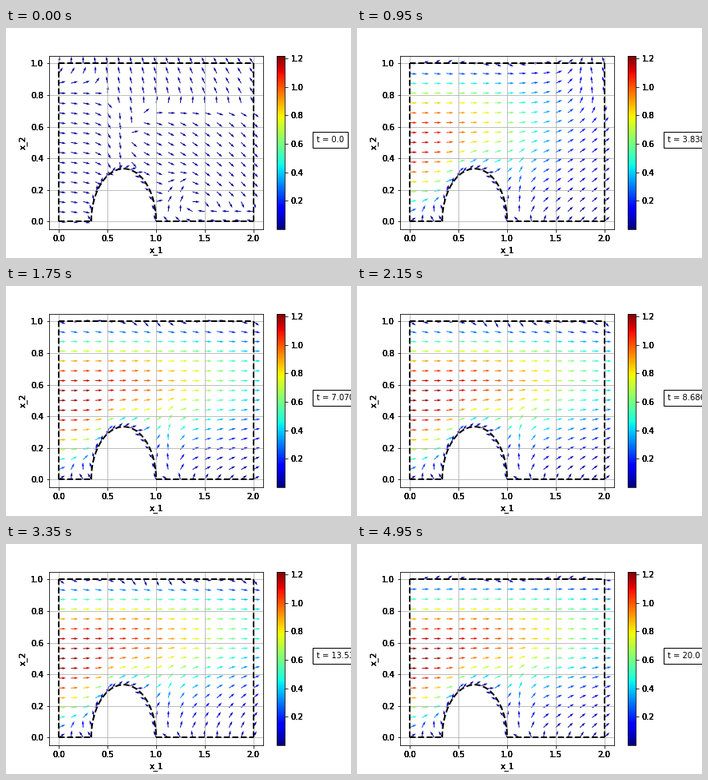
A matplotlib script for the animation above (5000 ms loop, 432x288 px).

```python
import numpy as np
import matplotlib.pyplot as plt
from matplotlib.animation import FuncAnimation

FRAMES, STEP_MS, T_END = 100, 50, 20.0
CX, RADIUS = 2 / 3, 1 / 3
V_MIN, V_MAX = 0.001, 1.218


def unit(deg):
    return np.exp(1j * np.radians(deg))


def sigmoid(s):
    return 1 / (1 + np.exp(-s))


def bump(s, width):
    return np.exp(-(s / width) ** 2)


def mix(a, b, w):
    return a + (b - a) * w


def sample_points():
    gx, gy = np.meshgrid(np.linspace(0, 2, 17), np.linspace(0, 1, 17))
    outside = np.hypot(gx - CX, gy) > RADIUS + 0.005
    arc = np.linspace(0, np.pi, 17)
    return (np.append(gx[outside], CX + RADIUS * np.cos(arc)),
            np.append(gy[outside], RADIUS * np.sin(arc)))


x, y = sample_points()
gap = np.maximum(np.hypot(x - CX, y) - RADIUS, 0)
bearing = np.degrees(np.arctan2(y, x - CX))


def rest_field():
    """Faint drift before the inflow starts."""
    z = unit(-8 - 20 * x)
    z = mix(z, unit(-80), bump(x - 0.6, 0.17))
    ceiling = 0.92 - 0.2 * sigmoid((x - 0.45) / 0.08) - 0.15 * bump(x - 0.75, 0.1)
    z = mix(z, unit(95 + 14 * x), sigmoid((y - ceiling) / 0.05))
    z = mix(z, unit(165), sigmoid((0.1 - y) / 0.03) * sigmoid((x - 1.05) / 0.05))
    return mix(z, unit(70), bump(np.hypot(x - 1.2, y - 0.15), 0.15))


rest = rest_field()


def front(t):
    return 0.5 * t - 0.6


def speed(t):
    ramp = 1 - np.exp(-(t / 0.8) ** 1.5)
    skew = 1 + x * (0.25 + 0.3 * min(t / 17, 1))
    profile = np.maximum(np.sin(np.pi * y ** skew), 0) ** 0.95
    wall = 1 - np.exp(-gap / 0.07)
    reach = sigmoid((front(t) - x) / 0.45)
    return 0.03 + 1.18 * ramp * profile * wall * reach * np.exp(-0.24 * x ** 2)


def direction(t):
    swing = np.cos(2 * np.pi * (t - 7) / 13) * np.exp(-abs(t - 7) / 12)
    lift = 50 - 22 * swing
    dip = -12 * np.sin(np.pi * t / 18.5)
    top = 10 - 55 * bump(t - 11.5, 5.5)
    low = np.clip((0.62 - y) / 0.55, 0, 1) ** 1.2

    # wake behind the obstacle
    angle = lift * low * sigmoid((x - 0.9) / 0.15)
    angle += (105 - lift) * np.clip(1.6 * low, 0, 1) * bump(x - 1.12, 0.14)
    angle += 60 * bump(y, 0.03) * np.clip(2 - x, 0, 1) * (x > 1)
    # rise over the obstacle and the corner before it
    angle += 35 * np.exp(-gap / 0.12) * sigmoid((0.95 - x) / 0.05)
    angle += (30 + 75 * np.clip(x / 0.2, 0, 1)) * bump(y, 0.11) * (x < 0.4)
    angle += dip * bump(y - 0.95, 0.08)
    z = unit(angle)

    # fluid the front has not reached yet
    ahead = sigmoid((x - front(t) - 0.15) / 0.2) * np.clip(x / 0.4, 0, 1)
    climb = sigmoid((y - 0.7) / 0.06) * sigmoid((x - front(t) - 0.35) / 0.08)
    z = mix(z, unit(40 + 75 * climb), ahead)

    z = mix(z, unit(top + 30 * np.sin(5 * x)), bump(1 - y, 0.03) * (1 - ahead))
    z = mix(z, rest, np.exp(-t / 0.6))
    along = np.where(x < 0.85, bearing - 60, bearing + 110)
    z = mix(z, unit(along), bump(gap, 0.02))
    return z / np.maximum(abs(z), 1e-9)


def heavy(ax, text, xy, coords, offset, **style):
    """Stack copies of a label so its edges darken."""
    for _ in range(5):
        ax.annotate(text, xy, xycoords=coords, xytext=offset,
                    textcoords="offset points", **style)


plt.rcParams.update({"font.family": "DejaVu Sans", "font.size": 10})
fig, ax = plt.subplots(figsize=(6, 4), dpi=72)
fig.subplots_adjust(left=0.125, bottom=0.125, right=0.9, top=0.88)

arrows = ax.quiver(x, y, np.ones_like(x), np.zeros_like(x), np.zeros_like(x),
                   cmap="jet", scale=30, width=0.0036)
arrows.set_clim(V_MIN, V_MAX)
bar = fig.colorbar(arrows, ax=ax)

theta = np.linspace(np.pi, 0, 100)
for px, py in [
    ([0, CX - RADIUS], [0, 0]),
    (CX + RADIUS * np.cos(theta), RADIUS * np.sin(theta)),
    ([CX + RADIUS, 2], [0, 0]),
    ([2, 2], [0, 1]),
    ([0, 2], [1, 1]),
    ([0, 0], [0, 1]),
]:
    ax.plot(px, py, "k--", lw=2)

x_ticks = np.arange(5) * 0.5
y_ticks = np.arange(6) * 0.2
bar_ticks = np.arange(1, 7) * 0.2
ax.set(xlim=(-0.1, 2.1), ylim=(-0.05, 1.05), xticks=x_ticks, yticks=y_ticks)
ax.grid(True)
ax.tick_params(labelbottom=False, labelleft=False)
bar.set_ticks(bar_ticks)
bar.ax.tick_params(labelright=False)

for v in x_ticks:
    heavy(ax, f"{v:.1f}", (v, 0), ("data", "axes fraction"), (0, -7),
          ha="center", va="top")
for v in y_ticks:
    heavy(ax, f"{v:.1f}", (0, v), ("axes fraction", "data"), (-7, 0),
          ha="right", va="center_baseline")
for v in bar_ticks:
    heavy(bar.ax, f"{v:.1f}", (1, v), ("axes fraction", "data"), (7, 0),
          ha="left", va="center_baseline")
heavy(ax, "x_1", (0.5, 0), "axes fraction", (0, -21), ha="center", va="top")
heavy(ax, "x_2", (0, 0.5), "axes fraction", (-27, 0), ha="center",
      va="bottom", rotation=90, rotation_mode="anchor")

clock = ax.text(1.25, 0.5, "", transform=ax.transAxes,
                bbox=dict(facecolor="white", edgecolor="black", pad=5))


def update(i):
    t = T_END * i / (FRAMES - 1)
    z = direction(t)
    arrows.set_UVC(z.real, z.imag, speed(t))
    clock.set_text(f"t = {t}")
    return arrows, clock


anim = FuncAnimation(fig, update, frames=FRAMES, interval=STEP_MS, repeat=True)
plt.show()
```
